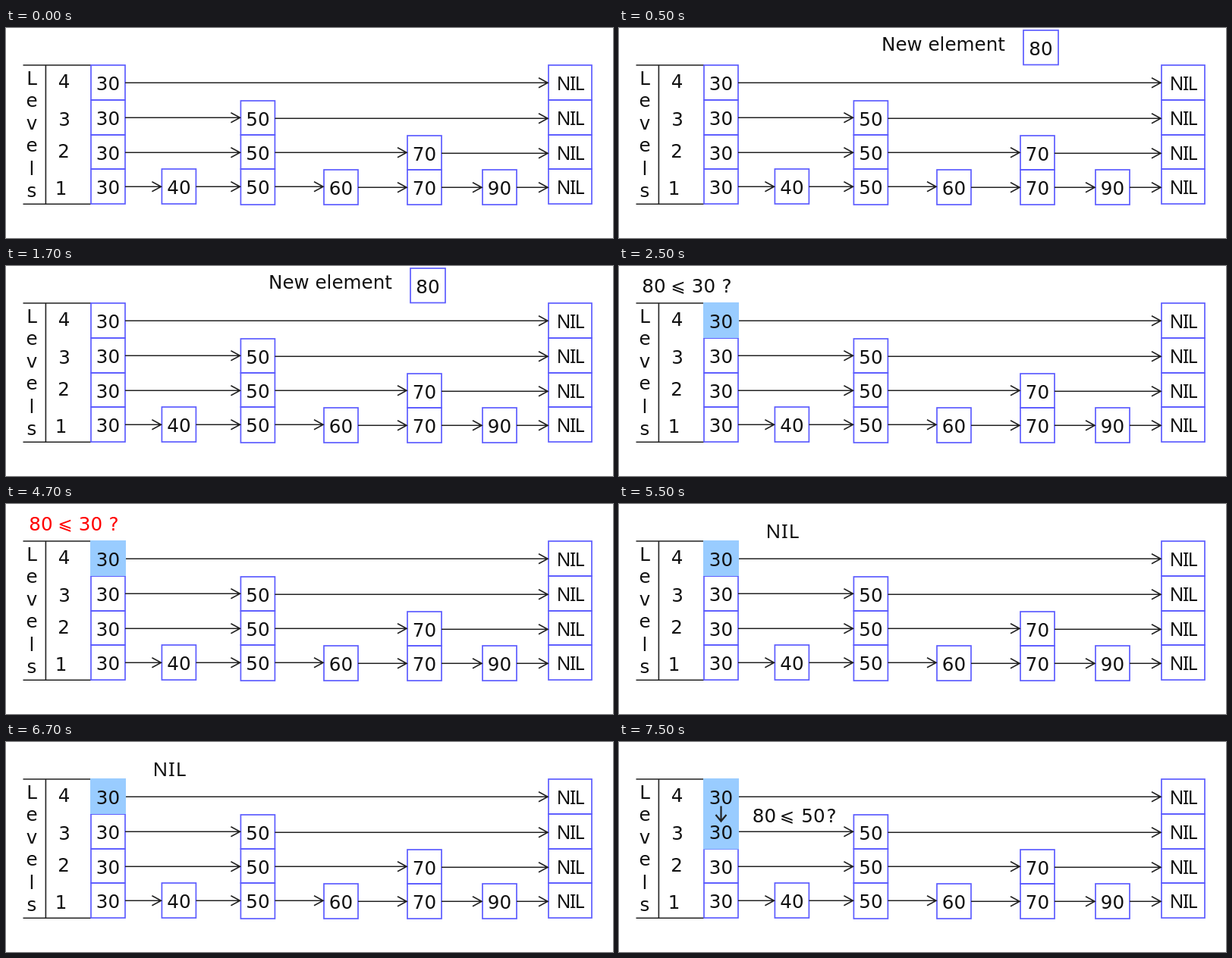
An HTML page for the animation above (8 s loop, 800x277 px).

```html
<!DOCTYPE html>
<html lang="en">
<head>
<meta charset="utf-8">
<title>Skip list insertion</title>
<style>
  html, body { margin: 0; width: 100%; height: 100%; overflow: hidden; background: #fff; }
  svg { display: block; width: 100vw; height: 100vh; }
  text { font: 24.6px "DejaVu Sans", sans-serif; fill: #111; text-anchor: middle; }
  .nil { font: 24.6px "Noto Sans", sans-serif; letter-spacing: -1.4px; }
  .wide { font-size: 26px; letter-spacing: 0.8px; text-anchor: start; }
  .start { text-anchor: start; }
  .sign { font-size: 23px; }
  .red text { fill: #f00; }
  .box { fill: none; stroke: #5c5cff; stroke-width: 1.7; }
  .line { fill: none; stroke: #222; stroke-width: 1.6; }
  .bold { stroke-width: 2.2; }
  .mark { fill: #9cf; }
</style>
</head>
<body>
<svg id="stage" viewBox="0 0 800 277"></svg>
<script>
const stage = document.getElementById('stage');
const LOOP = 8000;
const rows = [49, 95, 140.8, 185.9, 232];

function add(parent, tag, attrs, content = '') {
  const el = document.createElementNS('http://www.w3.org/2000/svg', tag);
  for (const key in attrs) el.setAttribute(key, attrs[key]);
  el.textContent = content;
  parent.appendChild(el);
  return el;
}
const group = (cls = '') => add(stage, 'g', { class: cls });
const text = (g, x, y, str, cls = '') => add(g, 'text', { x, y, class: cls }, str);
const line = (g, d, cls = '') => add(g, 'path', { d, class: `line ${cls}` });
const box = (g, x, y, width, height) => add(g, 'rect', { x, y, width, height, class: 'box' });
const mark = (g, y, height) => add(g, 'rect', { x: 111, y, width: 47, height, class: 'mark' });
const arrow = (g, x1, x2, y) =>
  line(g, `M${x1} ${y}H${x2}M${x2 - 12} ${y - 6.5}L${x2} ${y}L${x2 - 12} ${y + 6.5}`);

// Whole-pixel height inside a row of a tower
const rowY = (r, drop, offset = 0) => Math.round(rows[r] + drop + offset);

// Tower of cells from its first row down to the bottom level
function tower(g, { x, w = 45, first, drop = 0, label, cls }) {
  for (let r = first; r < 4; r++) {
    const y = rowY(r, drop);
    box(g, x, y, w, rowY(r + 1, drop) - y);
    text(g, x + w / 2, rowY(r, drop, 33), label, cls);
  }
}

const base = group();
const marks = { one: group(), two: group() };
mark(marks.one, 48, 47);
mark(marks.two, 48, 93.5);

line(base, 'M22.5 49H112M22.5 232.2H112M52.4 49V232.2');
[['L', 75], ['e', 104], ['v', 134], ['e', 163], ['l', 194], ['s', 223]]
  .forEach(([c, y]) => text(base, 34, y, c));
[['4', 76.5, 79], ['3', 77, 129], ['2', 76, 171], ['1', 72.5, 220]]
  .forEach(([c, x, y]) => text(base, x, y, c));

const towers = [
  { x: 112, first: 0, label: '30' },
  { x: 205.4, first: 3, label: '40' },
  { x: 309.4, first: 1, label: '50', drop: 0.5 },
  { x: 419, first: 3, label: '60', drop: 1 },
  { x: 529, first: 2, label: '70', drop: 1 },
  { x: 628, first: 3, label: '90', drop: 1 },
  { x: 715, w: 57, first: 0, label: 'NIL', cls: 'nil' }
];
towers.forEach(t => tower(base, t));

// Link neighbours on every level
for (let r = 0; r < 4; r++) {
  const level = towers.filter(t => t.first <= r);
  for (let i = 1; i < level.length; i++) {
    const { x, w = 45, drop = 0 } = level[i - 1];
    arrow(base, x + w, level[i].x - 1, rowY(r, drop, 23) + 0.2);
  }
}

// Highlighted cells cover the frame but not their labels
for (const [g, count] of [[marks.one, 1], [marks.two, 2]]) {
  stage.appendChild(g);
  for (let r = 0; r < count; r++) text(g, 134.5, rowY(r, 0, 33), '30');
}
line(marks.two, 'M134.5 84.5V104.5M127.5 96L134.5 104.5L141.5 96', 'bold');

const fresh = group();
text(fresh, 346, 30, 'New element', 'start');
box(fresh, 533, 3, 46, 45.5);
text(fresh, 556, 36, '80');

// Comparison text; each part sits at its own centre
function compare(y, parts, cls) {
  const g = group(cls);
  for (const [str, x] of parts)
    text(g, x, str === '⩽' ? y - 1.5 : y, str, str === '⩽' ? 'sign' : '');
  return g;
}
const first = [['80', 46], ['⩽', 78], ['30', 111.5], ['?', 142]];
const ask = compare(35, first);
const no = compare(35, first, 'red');
const next = compare(106, [['80', 191.5], ['⩽', 221.5], ['50', 256], ['?', 280]]);

const end = group();
text(end, 193.5, 45, 'NIL', 'nil wide');

const steps = [
  [0, []],
  [500, [fresh]],
  [2500, [marks.one, ask]],
  [3500, [marks.one, no]],
  [5500, [marks.one, end]],
  [7500, [marks.two, next]]
];
const parts = [marks.one, marks.two, fresh, ask, no, end, next];

function draw() {
  const t = performance.now() % LOOP;
  const shown = steps.filter(s => s[0] <= t).pop()[1];
  parts.forEach(p => p.setAttribute('visibility', shown.includes(p) ? 'visible' : 'hidden'));
  requestAnimationFrame(draw);
}
draw();
</script>
</body>
</html>
```
